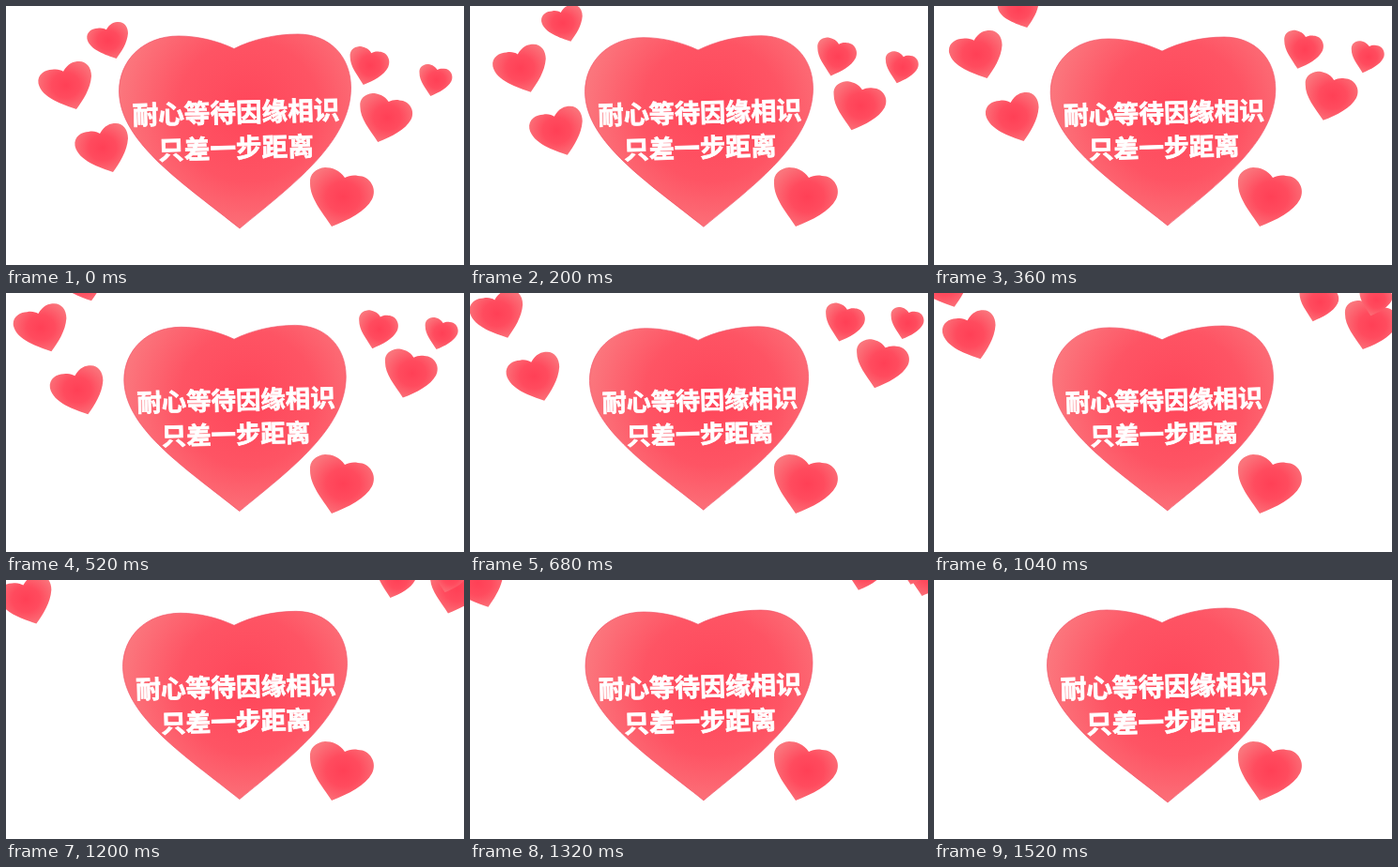
Recreate the animation shown at these times as an HTML page. Size 488 px wide and 276 px high, loop 1600 ms.

```html
<!DOCTYPE html>
<html lang="zh">
<head>
<meta charset="utf-8">
<title>Hearts</title>
<style>
  html, body { margin: 0; width: 100%; height: 100%; overflow: hidden; background: #fff; }
  svg { display: block; width: 488px; height: 276px; }
  text {
    font: 900 27.6px "Noto Sans CJK SC", "Noto Sans CJK", sans-serif;
    fill: #fff; stroke: #fff; stroke-width: .8; text-anchor: middle;
  }
</style>
</head>
<body>
<svg viewBox="0 0 488 276">
  <defs>
    <radialGradient id="bigFill" gradientUnits="userSpaceOnUse" cx="258" cy="112" r="138">
      <stop offset="0" stop-color="#ff465a"/>
      <stop offset=".55" stop-color="#fe5464"/>
      <stop offset="1" stop-color="#fb767d"/>
    </radialGradient>
    <radialGradient id="smallFill" cx=".52" cy=".5" r=".58">
      <stop offset="0" stop-color="#ff4056"/>
      <stop offset=".45" stop-color="#ff4b5e"/>
      <stop offset="1" stop-color="#fa757c"/>
    </radialGradient>
    <path id="leanRight" fill="url(#smallFill)" d="M38 11C33 3 24 0 17 0C7 1 0 7 1 17C1 33 13 46 24 63
      C42 56 60 47 67 34C73 23 65 9 52 9C47 8 42 9 38 11Z"/>
    <path id="leanLeft" fill="url(#smallFill)" d="M27 11C32 2 38 0 44 0C52 0 57 7 57 16C56 30 48 42 41 52
      C27 47 4 40 .5 24C-1 14 8 9 15 9C20 8 24 9 27 11Z"/>
  </defs>
  <g id="big">
    <path fill="url(#bigFill)" stroke="#f0566a" stroke-width=".7" d="M243 45.500C225 37 204 32 184 32C146 32 120.500 58 120.500 91
      C121 146 192 191 249 237C305 191 367.500 145 367.500 87C367.500 54 345 30 311 30C286 30 262 36 243 45.500Z"/>
    <g transform="rotate(-1.500 245 132)">
      <text x="245.500" y="123.500">耐心等待因缘相识</text>
      <text x="244.500" y="161.500">只差一步距离</text>
    </g>
  </g>
  <g id="small"></g>
</svg>
<script>
  const FRAME = 40, LAST = 1520, LOOP = 1600, TURN = 840;
  const CENTER = [244.2, 133], MIN_SCALE = 0.931;
  const SHAPE_SIZE = { leanLeft: [57, 52], leanRight: [70, 63] };

  // first: drift until TURN; then: drift from TURN to LAST
  const hearts = [
    { shape: "leanLeft", box: [86, 17, 44, 39], first: [-43, -77], then: [-35, -62] },
    { shape: "leanLeft", box: [34, 59, 57, 51], first: [-43, -77], then: [-35, -62] },
    { shape: "leanLeft", box: [73, 125, 57, 52], first: [-43, -77], then: [-73, -101] },
    { shape: "leanRight", box: [366, 43, 43, 41], first: [15.5, -40], then: [25, -47] },
    { shape: "leanRight", box: [376.5, 93, 57.5, 52], first: [43, -54], then: [60, -105] },
    { shape: "leanRight", box: [440, 62, 36, 34], first: [10, -58], then: [10, -47] },
    { shape: "leanRight", box: [323, 172, 70, 63], first: [0, 0], then: [0, 0] }
  ];

  const big = document.getElementById("big");
  const layer = document.getElementById("small");
  for (const heart of hearts) {
    heart.node = document.createElementNS("http://www.w3.org/2000/svg", "use");
    heart.node.setAttribute("href", "#" + heart.shape);
    layer.append(heart.node);
  }

  function draw(now) {
    const t = Math.min(LAST, Math.floor((now % LOOP) / FRAME) * FRAME);
    const a = Math.min(1, t / TURN);
    const b = Math.max(0, (t - TURN) / (LAST - TURN));

    const scale = 1 - (1 - MIN_SCALE) * (a - b);
    const [cx, cy] = CENTER;
    big.setAttribute("transform", `translate(${cx} ${cy}) scale(${scale}) translate(${-cx} ${-cy})`);

    for (const { node, shape, box: [x, y, w, h], first, then } of hearts) {
      const left = x + first[0] * a + then[0] * b;
      const top = y + first[1] * a + then[1] * b;
      const [sw, sh] = SHAPE_SIZE[shape];
      node.setAttribute("transform", `translate(${left} ${top}) scale(${w / sw} ${h / sh})`);
    }
  }

  const start = performance.now();
  function tick() {
    draw(performance.now() - start);
    requestAnimationFrame(tick);
  }
  tick();
</script>
</body>
</html>
```
